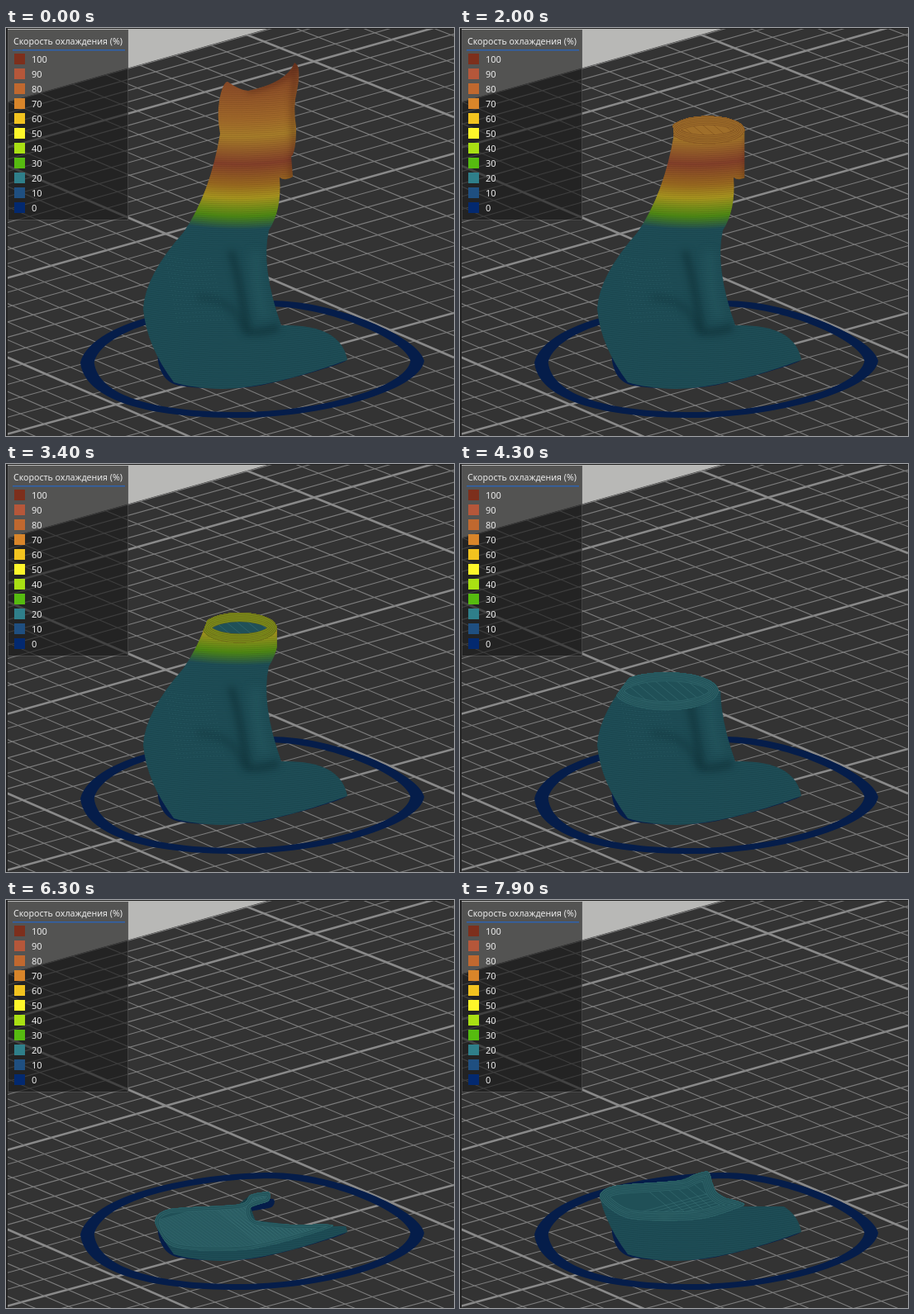
Write an HTML page with a canvas that moves like this. It is 542 px wide and 494 px high and loops after 8 s.

```html
<!DOCTYPE html>
<html lang="ru">
<head>
<meta charset="utf-8">
<style>
html, body { margin: 0; width: 100%; height: 100%; overflow: hidden; background: #333; }
canvas { display: block; }
</style>
</head>
<body>
<canvas id="stage" width="542" height="494"></canvas>
<script>
const W = 542, H = 494, LOOP = 8000;
const ctx = document.getElementById('stage').getContext('2d');

const NAVY = '#051d4a', TEAL = '#205057';
const PALETTE = ['#7d2f1c', '#b5573a', '#c0682f', '#d8852a', '#f2c31f', '#fdf62a',
  '#a9e013', '#56bb10', '#2f7f8a', '#1f4f80', '#03296f'];

// [time in ms, screen height of the rear edge of the cut]
const CUTS = [[0, 42], [1300, 88], [1800, 96], [3400, 180], [4300, 252],
  [5500, 324], [6500, 360], [7000, 360], [7900, 328]];

// [screen height, model colour]
const TONES = [[45, '#67301c'], [65, '#8a4a28'], [112, '#a26a2a'], [132, '#a87e2a'],
  [165, '#84402a'], [190, '#9a6a20'], [206, '#a8961f'], [228, '#4d8a14'], [244, '#1f4e57']];

const BODY = new Path2D(`M258 88Q262 66 268 65Q284 76 293 76Q340 66 349 42Q358 46 352 76
  Q347 95 351 120Q351 150 345 156L347 180Q338 186 331 181Q334 220 318 245Q308 290 333 360
  Q405 358 413 402Q320 436 262 437Q225 436 203 429Q170 385 166 340Q168 300 215 247
  Q247 200 259 128Q255 105 258 88Z`);

const SKIRT = new Path2D(`M90 405C105 350 250 330 320 330C400 330 500 375 506 403
  C500 440 380 472 280 472C170 472 95 450 90 405Z`);

// Sections are twelve points, clockwise from the left end.
const ring = (top, cx, rx, ry) => [top, Array.from({ length: 12 }, (_, i) => {
  const a = Math.PI * (1 + i / 6);
  return [cx + rx * Math.cos(a), top + ry + ry * Math.sin(a)];
})];

const HAUNCH = [[168, 357], [184, 342], [262, 335], [280, 329], [297, 325], [303, 338],
  [312, 350], [324, 356], [338, 361], [332, 367], [285, 381], [205, 380]];
const BASE = [[184, 402], [199, 383], [286, 377], [300, 364], [323, 361], [321, 371],
  [292, 378], [296, 396], [345, 401], [411, 402], [300, 433], [206, 431]];

const SECTIONS = [ring(42, 336, 18, 0.2), ring(88, 304, 46, 17), ring(143, 291, 42, 17),
  ring(201, 278, 47, 19), ring(252, 250, 63, 23), [324, HAUNCH], [360, BASE]];

const mix = (a, b, f) => a + (b - a) * f;
const mixPoints = (a, b, f) =>
  a.map(([x, y], i) => [mix(x, b[i][0], f), mix(y, b[i][1], f)]);

function mixColor(a, b, f) {
  const part = (c, i) => parseInt(c.slice(i, i + 2), 16);
  return `rgb(${[1, 3, 5].map(i => Math.round(mix(part(a, i), part(b, i), f)))})`;
}

function lookup(table, x, blend) {
  const i = table.findIndex(([key]) => x <= key);
  if (i < 0) return table[table.length - 1][1];
  if (i === 0) return table[0][1];
  const [x0, a] = table[i - 1], [x1, b] = table[i];
  return blend(a, b, (x - x0) / (x1 - x0));
}

// Closed smooth curve through all points.
function smooth(points) {
  const path = new Path2D(), n = points.length;
  const at = i => points[(i + n) % n];
  path.moveTo(...points[0]);
  points.forEach((b, i) => {
    const a = at(i - 1), c = at(i + 1), d = at(i + 2);
    path.bezierCurveTo(b[0] + (c[0] - a[0]) / 7, b[1] + (c[1] - a[1]) / 7,
      c[0] - (d[0] - b[0]) / 7, c[1] - (d[1] - b[1]) / 7, ...c);
  });
  path.closePath();
  return path;
}

function layer(draw) {
  const c = document.createElement('canvas');
  c.width = W;
  c.height = H;
  draw(c.getContext('2d'));
  return c;
}

function line(g, x0, y0, x1, y1) {
  g.beginPath();
  g.moveTo(x0, y0);
  g.lineTo(x1, y1);
  g.stroke();
}

// Parallel bed lines in perspective; every tenth one is bold.
function drawRules(g, left, right) {
  for (let k = -18; k <= 20; k++) {
    const bold = k % 10 === 0;
    g.strokeStyle = bold ? '#8a8a8a' : '#7c7c7c';
    g.lineWidth = bold ? 2.6 : 1.1;
    line(g, 0, left(k / 10), W, right(k / 10));
  }
}

function drawBed(g) {
  g.fillStyle = '#b8b8b6';
  g.fillRect(0, 0, W, H);
  g.save();
  g.clip(new Path2D('M0 90L320 0H542V494H0Z'));
  g.fillStyle = '#333';
  g.fillRect(0, 0, W, H);
  drawRules(g, m => 303 + 173.5 * m + 15.5 * m * m, m => 152 + 176 * m + 17 * m * m);
  drawRules(g, m => 166 + 253 * m - 21 * m * m, m => 399 + 263 * m - 28 * m * m);
  g.restore();
  g.fillStyle = '#222';
  g.fillRect(0, 0, 2, H);
  g.fillRect(0, 0, W, 1);
}

function drawSkirt(g) {
  const band = new Path2D(SKIRT);
  const inset = new DOMMatrix().translate(298, 402).scale(0.92, 0.9).translate(-298, -402);
  band.addPath(SKIRT, inset);
  g.fillStyle = NAVY;
  g.fill(band, 'evenodd');
}

function drawLegend(g) {
  g.fillStyle = 'rgba(28,28,28,.64)';
  g.fillRect(2, 2, 146, 230);
  g.strokeStyle = 'rgba(100,100,100,.5)';
  g.lineWidth = 1;
  g.strokeRect(2.5, 2.5, 145, 230);
  g.fillStyle = '#2f62ad';
  g.fillRect(8, 26, 136, 1.5);
  const text = (size, label, x, y) => {
    g.font = `${size}px "Noto Sans", "Open Sans", sans-serif`;
    g.fillStyle = '#ececec';
    g.fillText(label, x, y);
  };
  text(10.6, 'Скорость охлаждения (%)', 9, 20);
  PALETTE.forEach((color, i) => {
    const y = 31 + 18 * i;
    g.fillStyle = color;
    g.fillRect(10, y, 13, 13);
    text(11, 100 - 10 * i, 31, y + 11);
  });
}

function drawModel(g) {
  g.clip(BODY);
  const far = 160, reach = 500 + far;
  const tone = g.createRadialGradient(285, -far, 0, 285, -far, reach);
  TONES.forEach(([y, c]) => tone.addColorStop((y + far) / reach, c));
  g.fillStyle = tone;
  g.fillRect(0, 0, W, H);

  const shade = (color, width, d) => {
    g.filter = `blur(${width / 2}px)`;
    g.strokeStyle = color;
    g.lineWidth = width;
    g.stroke(new Path2D(d));
    g.filter = 'none';
  };
  shade('rgba(10,38,44,.5)', 8, 'M272 270Q282 300 292 368Q310 370 330 362');
  shade('rgba(12,42,48,.3)', 8, 'M232 326Q278 328 288 366');
  shade('rgba(60,125,128,.2)', 12, 'M302 270Q302 320 314 352');
  shade('rgba(50,15,10,.3)', 7, 'M292 76Q340 66 352 45Q344 95 349 140L345 184');

  // Print layers.
  g.lineWidth = 0.7;
  for (let y = 44; y < 450; y += 2.5) {
    g.strokeStyle = y < 240 ? 'rgba(40,20,0,.18)' : 'rgba(8,35,40,.25)';
    g.stroke(new Path2D(`M150 ${y - 9}Q280 ${y + 14} 430 ${y - 14}`));
  }
  g.setLineDash([1, 3]);
  g.strokeStyle = 'rgba(85,145,148,.3)';
  for (let i = 0; i < 16; i++)
    g.stroke(new Path2D(`M${192 + i} ${274 + 5.5 * i}q30 ${12 - i} 58 ${4 - i / 2}`));
}

// Everything of the model that lies below the section.
function belowCut(points, cap) {
  const xs = points.map(p => p[0]);
  const last = xs.indexOf(Math.max(...xs));
  const [x, y] = points[last], side = Math.max(230, y);
  const edge = [[0, points[0][1]], ...points.slice(0, last + 1),
    [x, side], [W, side], [W, H], [0, H]];
  const path = new Path2D(`M${edge.join('L')}Z`);
  path.addPath(cap);
  return path;
}

function drawCap(points, cap, cut) {
  const front = Math.max(...points.map(p => p[1]));
  const wall = front > 244 ? TEAL : lookup(TONES, front, mixColor);
  const inHead = cut < 112, nearBed = cut > 345;
  ctx.save();
  ctx.clip(BODY);
  ctx.clip(cap);
  ctx.fillStyle = inHead ? wall : TEAL;
  ctx.fillRect(0, 0, W, H);

  // Infill.
  ctx.strokeStyle = inHead ? 'rgba(80,40,10,.35)' : 'rgba(75,135,138,.4)';
  ctx.lineWidth = 0.8;
  for (let x = 0; x < 900; x += nearBed ? 5 : 13) {
    line(ctx, x - 200, 0, x + 400, H);
    line(ctx, x - 200, H, x + 500, 300);
  }
  // Nested walls.
  const trace = (color, width) => {
    ctx.strokeStyle = color;
    ctx.lineWidth = width;
    ctx.stroke(cap);
  };
  for (let w = nearBed ? 10 : 22; w > 1; w -= 4) {
    trace(wall, w);
    trace(cut > 200 ? 'rgba(75,135,138,.4)' : 'rgba(80,40,20,.4)', w);
    trace(wall, w - 1.6);
  }
  ctx.restore();
}

function render(time) {
  // The slow middle part moves only on every second step.
  const slow = time >= 4100 && time < 5900;
  const t = slow ? Math.floor((time - 100) / 200) * 200 + 100 : Math.floor(time / 100) * 100;
  const cut = lookup(CUTS, t, mix);
  ctx.drawImage(bed, 0, 0);
  ctx.fillStyle = NAVY;
  ctx.fill(foot);
  if (cut <= 42) {
    ctx.drawImage(model, 0, 0);
    return;
  }
  const points = lookup(SECTIONS, cut, mixPoints);
  const cap = smooth(points);
  ctx.save();
  ctx.clip(belowCut(points, cap));
  ctx.drawImage(model, 0, 0);
  ctx.restore();
  drawCap(points, cap, cut);
}

const bed = layer(g => { drawBed(g); drawSkirt(g); drawLegend(g); });
const model = layer(drawModel);
const foot = smooth(BASE.map(([x, y]) => [x, y + 1]));

const start = performance.now();
function tick() {
  render((performance.now() - start) % LOOP);
  requestAnimationFrame(tick);
}
tick();
</script>
</body>
</html>
```
